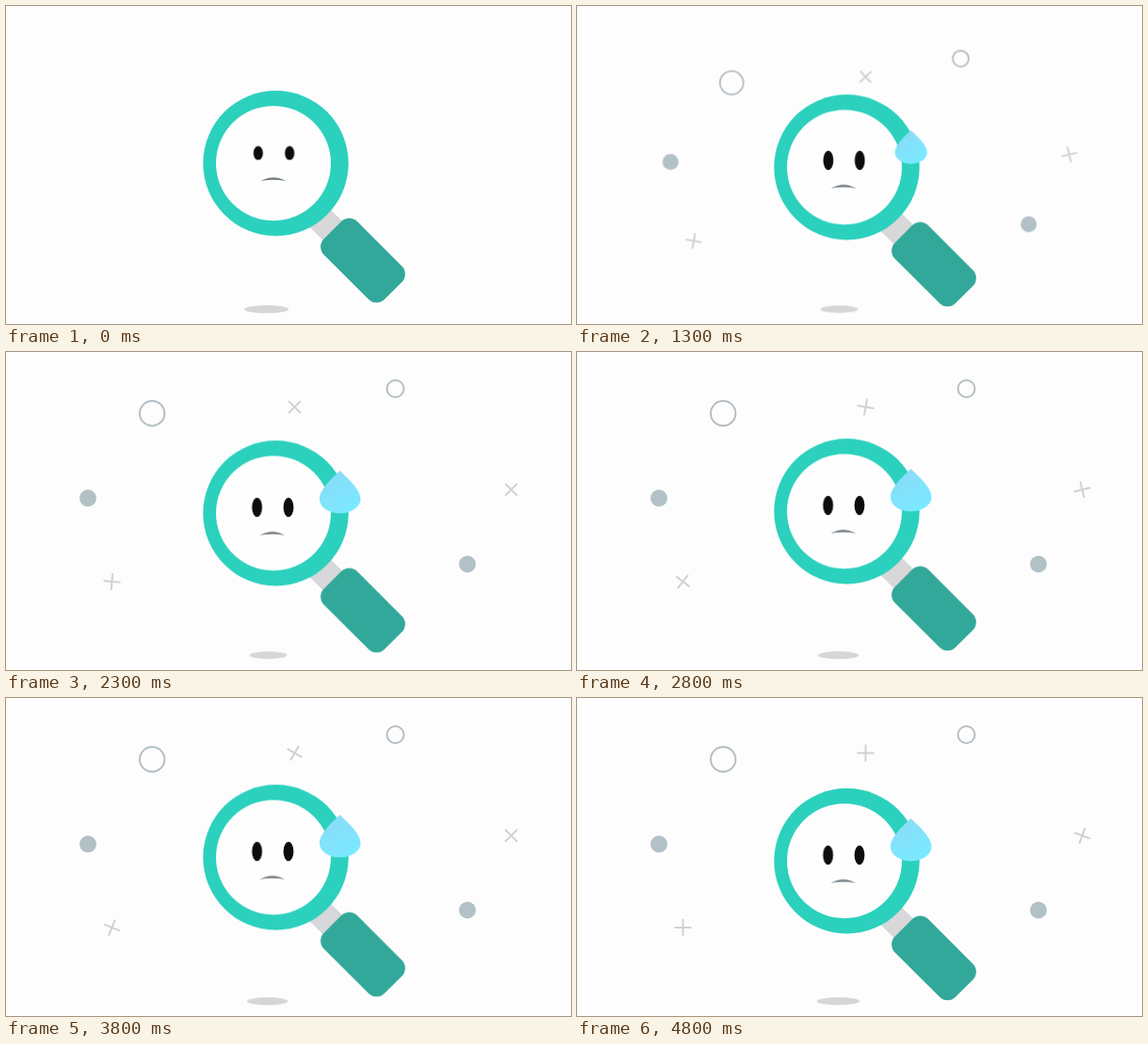
These frames come from a looping animation (600x338 px, 4.9 s). An HTML page without scripts:

```html
<!DOCTYPE html>
<html lang="en">
<head>
<meta charset="utf-8">
<title>Searching face</title>
<style>
  html, body { margin: 0; width: 100%; height: 100%; overflow: hidden; background: #fefdfe; }
  svg { display: block; width: 100vw; height: 100vh; }

  .burst, .spin, .bob, .shadow, .face, .eye, .drop { animation: 4.9s linear infinite; }
  .burst { transform-origin: 306px 340px; }
  .crosses { animation-name: burst-a; }
  .dots { animation-name: burst-b; }
  .top { animation-name: spin-top; }
  .left { animation-name: spin-left; }
  .right { animation-name: spin-right; }
  .bob, .shadow { animation-timing-function: cubic-bezier(.37, 0, .63, 1); }
  .bob { animation-name: bob; }
  .shadow { animation-name: shadow; transform-origin: 276.7px 322.3px; }
  .face { animation-name: slide; }
  .eye { animation-name: open; animation-timing-function: ease-out; }
  .drop { animation-name: drip; animation-timing-function: ease-out; transform-origin: 354.5px 150px; }

  /* shoot out, overshoot, sag, settle */
  @keyframes burst-a {
    0%, 2.04% { transform: scale(0); }
    12.24% { transform: scale(1.017); }
    14.29% { transform: scale(1.1); }
    16.33% { transform: scale(1.067); }
    24.49% { transform: scale(.945); }
    28% { transform: scale(.937); }
    36.73% { transform: scale(.961); }
    46.94%, 100% { transform: scale(1); }
  }
  @keyframes burst-b {
    0%, 2.04% { transform: scale(0); }
    12.24% { transform: scale(.953); }
    14.29% { transform: scale(1.105); }
    16.33% { transform: scale(1.066); }
    24.49% { transform: scale(.945); }
    28% { transform: scale(.943); }
    36.73% { transform: scale(.977); }
    46.94%, 100% { transform: scale(1); }
  }
  @keyframes spin-top {
    0% { transform: rotate(-72deg); }
    16.33% { transform: rotate(0deg); }
    36.73% { transform: rotate(93deg); }
    46.94% { transform: rotate(135deg); }
    67.35% { transform: rotate(245deg); }
    77.55% { transform: rotate(300deg); }
    97.96% { transform: rotate(360deg); }
    100% { transform: rotate(366deg); }
  }
  @keyframes spin-left {
    0% { transform: rotate(5deg); }
    16.33% { transform: rotate(65deg); }
    36.73% { transform: rotate(135deg); }
    46.94% { transform: rotate(185deg); }
    67.35% { transform: rotate(250deg); }
    77.55% { transform: rotate(292deg); }
    97.96% { transform: rotate(360deg); }
    100% { transform: rotate(367deg); }
  }
  @keyframes spin-right {
    0% { transform: rotate(-7deg); }
    16.33% { transform: rotate(45deg); }
    36.73% { transform: rotate(108deg); }
    46.94% { transform: rotate(135deg); }
    67.35% { transform: rotate(198deg); }
    77.55% { transform: rotate(225deg); }
    97.96% { transform: rotate(290deg); }
    100% { transform: rotate(296deg); }
  }
  @keyframes bob {
    0%, 20.41%, 40.82%, 61.22%, 81.63% { transform: translateY(0); }
    10.2%, 30.61%, 51.02%, 71.43% { transform: translateY(6.3px); }
    93%, 100% { transform: translateY(6px); }
  }
  @keyframes shadow {
    0%, 20.41%, 40.82%, 61.22%, 81.63% { transform: none; }
    10.2%, 30.61%, 51.02%, 71.43% { transform: translateX(2.7px) scale(.76, .9); }
    90% { transform: translateX(2px) scale(.84, .93); }
    97.96%, 100% { transform: translateX(.8px) scale(.96, .98); }
  }
  @keyframes slide {
    0% { transform: none; }
    16.33% { transform: translate(-.3px, 1px); }
    30.61%, 100% { transform: translate(-1.2px, 4.6px); }
  }
  @keyframes open {
    0% { transform: scale(.94, .72); }
    6.12%, 100% { transform: none; }
  }
  @keyframes drip {
    0%, 20.41% { transform: scale(0); }
    30.61%, 100% { transform: none; }
  }
</style>
</head>
<body>
<svg viewBox="0 0 600 338" preserveAspectRatio="none">
  <defs>
    <path id="cross" d="M-9 0H9M0-9V9" fill="none" stroke="#cdd2d5" stroke-width="2"/>
    <linearGradient id="water" x1="0" y1="0" x2=".5" y2="1">
      <stop offset=".2" stop-color="#8adcf8"/>
      <stop offset="1" stop-color="#7ae9ff"/>
    </linearGradient>
  </defs>

  <ellipse class="shadow" cx="276.7" cy="322.3" rx="23.7" ry="4.2" fill="#d6d5d8"/>

  <g class="burst dots">
    <g fill="#b2c1c5">
      <circle cx="87" cy="155.3" r="9"/>
      <circle cx="490" cy="225.5" r="9"/>
    </g>
    <circle cx="413.5" cy="39" r="9" fill="none" stroke="#b4bfc3" stroke-width="2"/>
  </g>
  <g class="burst crosses">
    <circle cx="155.2" cy="65.2" r="13.2" fill="none" stroke="#b4bfc3" stroke-width="2"/>
    <g transform="translate(306.5 58.5)"><use class="spin top" href="#cross"/></g>
    <g transform="translate(112.5 244)"><use class="spin left" href="#cross"/></g>
    <g transform="translate(536.5 146.3)"><use class="spin right" href="#cross"/></g>
  </g>

  <g class="bob">
    <path d="M325 217L356 248" stroke="#d8d7d9" stroke-width="29"/>
    <rect x="-45.5" y="-25" width="91" height="50" rx="12" transform="translate(379 270.4) rotate(45)" fill="#32a89a"/>
    <circle cx="286.5" cy="167.2" r="77.2" fill="#2bd1bd"/>
    <circle cx="284" cy="167.2" r="61" fill="#fefefe"/>
    <g class="face">
      <g fill="#0d0d10">
        <g transform="translate(267.8 156.3)"><ellipse class="eye" rx="5.4" ry="10.3"/></g>
        <g transform="translate(301.2 156.3)"><ellipse class="eye" rx="5.4" ry="10.3"/></g>
      </g>
      <path d="M270.5 186Q284 178.300 297.500 186Q284 183.300 270.500 186Z" fill="#727c82"/>
    </g>
    <path class="drop" d="M354.500 122C363 130 376.500 142 376.500 152C376.500 161 366 167.300 354.500 167.300S333 161 333 152C333 142 346 130 354.500 122Z" fill="url(#water)"/>
  </g>
</svg>
</body>
</html>
```
